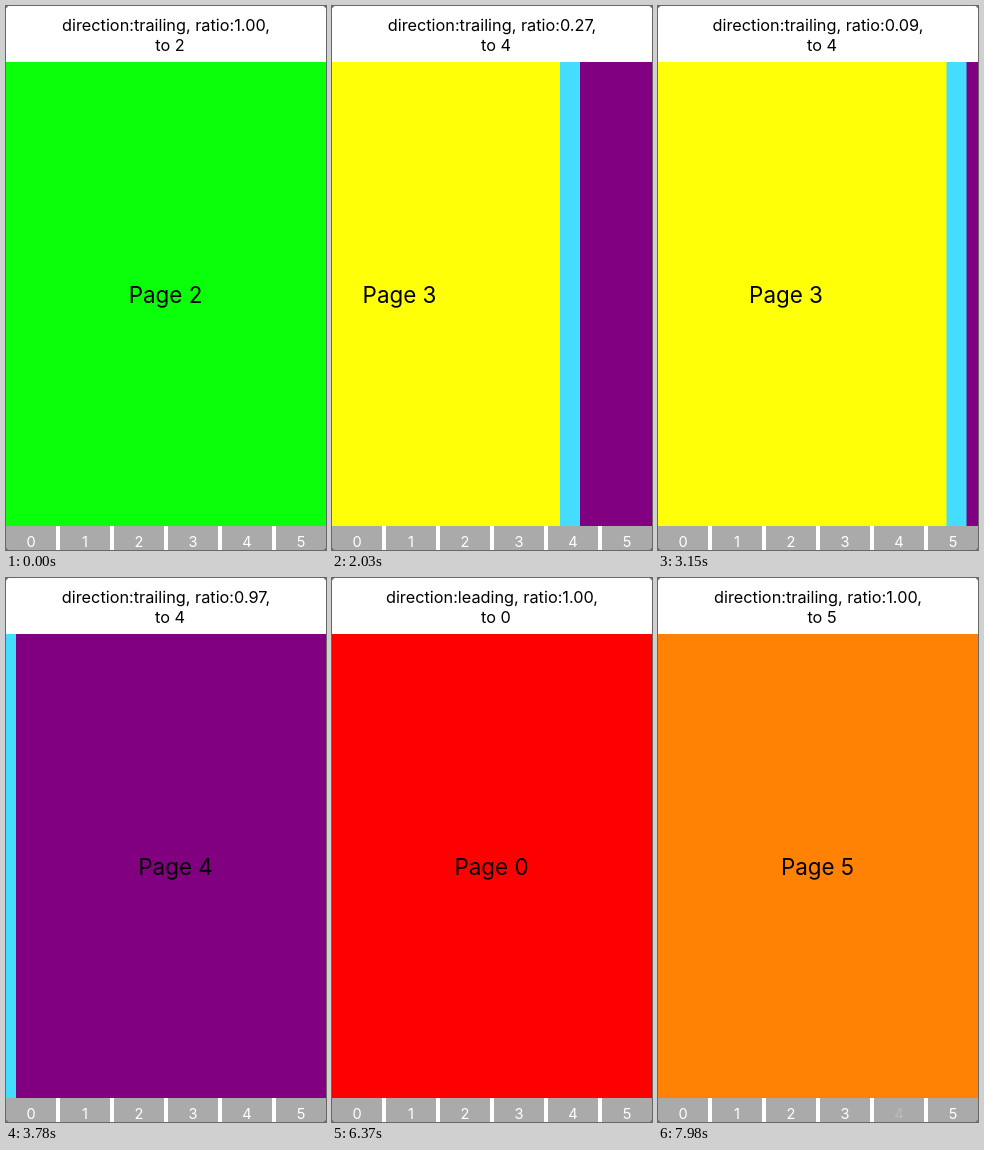
These frames come from a looping animation (320 by 544 pixels, 8000 ms). An HTML page:

```html
<!DOCTYPE html>
<html lang="en">
<head>
<meta charset="utf-8">
<title>Paging view</title>
<style>
  html, body { margin: 0; width: 100%; height: 100%; overflow: hidden; background: #fff; }
  svg { display: block; width: 320px; height: 544px; font-family: Inter, Roboto, sans-serif; text-anchor: middle; }
  .head { font-size: 16.3px; }
  .label { font-size: 22.4px; }
  .tab { font-size: 14.6px; fill: #fff; }
</style>
</head>
<body>
<svg viewBox="0 0 320 544">
  <rect width="320" height="544" fill="#fff"/>
  <text id="info" class="head" x="160" y="25"></text>
  <text id="goal" class="head" x="164" y="45"></text>
  <svg y="56" width="320" height="464" viewBox="0 0 320 464" overflow="hidden">
    <rect width="320" height="464" fill="#44ddff"/>
    <g id="pages"></g>
  </svg>
  <g id="tabs"></g>
  <path d="M0 0h2.5L0 2.5zM320 0v2.5L317.5 0zM0 544v-2.5L2.5 544zM320 544h-2.5L320 541.5z" fill="#777"/>
</svg>
<script>
const LOOP = 8000, TICK = 70, PITCH = 340;
const COLORS = ['#ff0000', '#0000ff', '#0aff0a', '#ffff08', '#800080', '#ff8204'];

const easeIn = u => u * u;
const easeOut = u => 1 - (1 - u) ** 2;
const smooth = u => u * u * (3 - 2 * u);

// A move runs from progress 0 at its start through legs of [end time, progress, easing].
const MOVES = [
  { from: 2, to: 3, start: 420, legs: [[700, .36, easeIn], [1190, 1, easeOut]] },
  { from: 3, to: 4, start: 1540, drag: true, legs: [
    [2310, .387, smooth], [2870, -.2, smooth], [3150, .0926, easeIn], [3920, 1, easeOut]] },
  { from: 4, to: 0, start: 5880, legs: [[6370, 1, smooth]] },
  { from: 0, to: 5, start: 7070, legs: [[7490, 1, smooth]] }
];

// Touch-down and touch-up times of the tab buttons.
const TAPS = [
  { tab: 0, down: 5740, up: 5880 },
  { tab: 5, down: 7000, up: 7070 },
  { tab: 4, down: 7910, up: LOOP }
];

const byId = id => document.getElementById(id);

function add(parent, tag, attrs, text = '') {
  const el = document.createElementNS('http://www.w3.org/2000/svg', tag);
  for (const name in attrs) el.setAttribute(name, attrs[name]);
  el.textContent = text;
  parent.append(el);
  return el;
}

const pages = COLORS.map((fill, i) => {
  const page = add(byId('pages'), 'g', {});
  add(page, 'rect', { width: 320, height: 464, fill });
  add(page, 'text', { class: 'label', x: 159.5, y: 240.5 }, `Page ${i}`);
  return page;
});

const tabs = COLORS.map((_, i) => {
  add(byId('tabs'), 'rect', { x: i * 54, y: 520, width: 50, height: 24, fill: '#aaa' });
  return add(byId('tabs'), 'text', { class: 'tab', x: i * 54 + 25, y: 541 }, i);
});

function progress({ start, legs }, t) {
  let time = start, value = 0;
  for (const [end, goal, ease] of legs) {
    if (t < end) return value + (goal - value) * ease((t - time) / (end - time));
    [time, value] = [end, goal];
  }
  return value;
}

function stateAt(t) {
  const move = MOVES.filter(m => t > m.start).pop();
  if (!move) return { from: 1, to: 2, side: 1, ratio: 1 };
  const p = progress(move, t);
  // A drag past its start reveals the neighbour on the other side.
  const side = move.drag ? (p < 0 ? -1 : 1) : Math.sign(move.to - move.from);
  return { from: move.from, to: move.drag ? move.from + side : move.to, side, ratio: Math.abs(p) };
}

function tabOpacity(tab, t) {
  const tap = TAPS.find(item => item.tab === tab && t >= item.down);
  return tap ? Math.min(1, .2 + .8 * Math.max(0, t - tap.up) / 280) : 1;
}

function draw(t) {
  const { from, to, side, ratio } = stateAt(t);
  byId('info').textContent = `direction:${side < 0 ? 'leading' : 'trailing'}, ratio:${ratio.toFixed(2)},`;
  byId('goal').textContent = `to ${to}`;
  pages.forEach((page, i) => {
    const x = side * PITCH * ((i === to ? 1 : 0) - ratio);
    page.style.display = i === from || i === to ? '' : 'none';
    page.setAttribute('transform', `translate(${Math.round(x * 2) / 2} 0)`);
  });
  tabs.forEach((label, i) => label.setAttribute('opacity', tabOpacity(i, t)));
}

const begin = performance.now();
function frame() {
  const t = (performance.now() - begin) % LOOP;
  draw(Math.floor(t / TICK) * TICK);
  requestAnimationFrame(frame);
}
frame();
</script>
</body>
</html>
```
